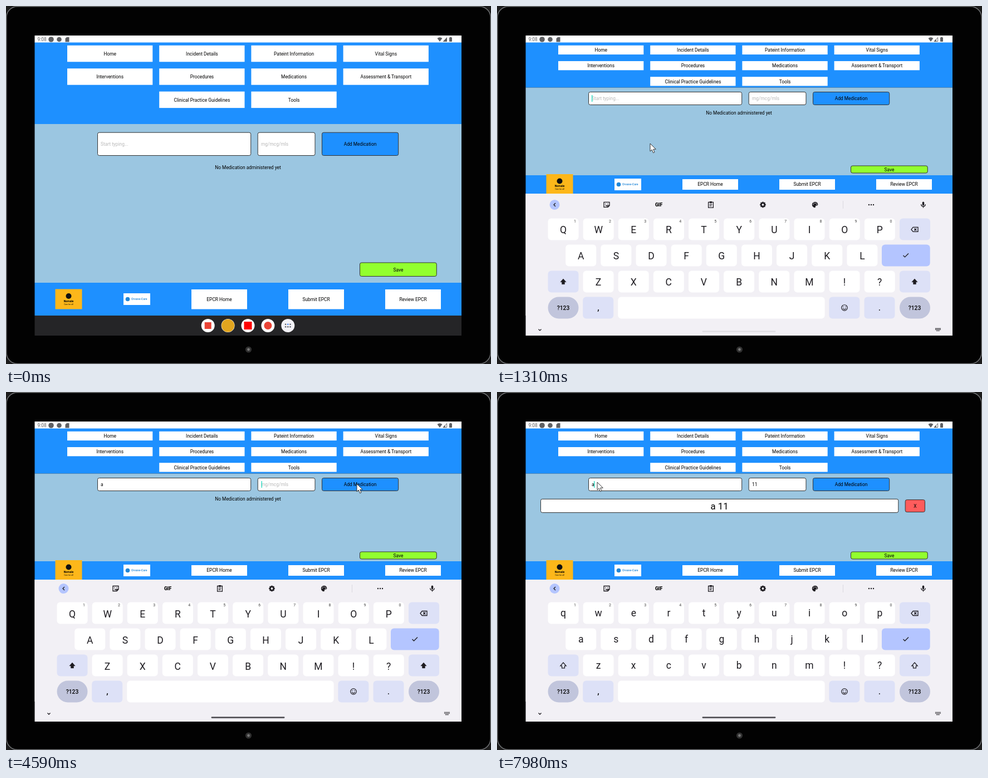
Write an HTML page that moves like this. It is 871 px wide and 643 px high and loops after 8000 ms.

```html
<!DOCTYPE html>
<html lang="en">
<head>
<meta charset="utf-8">
<title>Medication entry</title>
<style>
  html, body { margin: 0; width: 100%; height: 100%; overflow: hidden; background: #1c1c1c; }
  svg { display: block; width: 871px; height: 643px; }
  text { font-family: Roboto, "Open Sans", sans-serif; }
</style>
</head>
<body>
<svg id="stage" viewBox="0 0 871 643" xmlns="http://www.w3.org/2000/svg"></svg>
<script>
const LOOP = 8000;
const BLUE = '#1e90ff', PALE = '#9bc6e1', INK = '#1d1b20', KEY_ALT = '#dde1f7', ACCENT = '#b4c5ff';

const rect = (x, y, w, h, fill, extra = '') =>
  `<rect x="${x}" y="${y}" width="${w}" height="${h}" fill="${fill}" ${extra}/>`;
const disc = (x, y, r, fill, extra = '') => `<circle cx="${x}" cy="${y}" r="${r}" fill="${fill}" ${extra}/>`;
// y is the vertical middle of the capitals
const text = (s, x, y, size = 8.4, anchor = 'middle', extra = '') =>
  `<text x="${x}" y="${y + size * 0.355}" font-size="${size}" text-anchor="${anchor}" ${extra}>${s}</text>`;
const line = (d, extra = '') =>
  `<path d="${d}" fill="none" stroke="${INK}" stroke-width="1.3" ${extra}/>`;
const at = (x, y, body) => `<g transform="translate(${x} ${y})">${body}</g>`;
const group = (id, body) => `<g id="${id}">${body}</g>`;
const outlined = 'rx="3" stroke="#333" stroke-width="1"';

function statusBar() {
  const grey = '#5f6063';
  return rect(51.5, 53, 766.5, 12.5, '#fff')
    + text('9:08', 56.5, 60, 8.4, 'start', `fill="${grey}"`)
    + disc(81, 60, 4.8, grey) + disc(95.5, 60, 4.3, grey)
    + `<path d="M109 56h4.5v8.5h-7v-6z" fill="${grey}"/>`
    + `<path d="M774.5 58Q779 54.5 783.5 58L779 64Z" fill="${grey}"/>`
    + group('signalFull', `<path d="M784.5 64h7.5v-8z" fill="${grey}"/>`)
    + group('signalWeak', `<path d="M785 63.6h6.6v-7z" fill="#fff" stroke="${grey}" stroke-width=".9"/><path d="M784.5 64h4.3v-4.5z" fill="${grey}"/>`)
    + rect(796, 56.5, 5, 7.5, grey, 'rx=".7"') + rect(797.5, 55.5, 2, 1.5, grey);
}

function app(compact) {
  const L = compact
    ? { step: 28.2, h: 16.3, head: 146.5, field: 154, fieldH: 24, save: 286.5, saveH: 14, foot: 304, end: 337, btn: 311, btnH: 19, logo: 302, logoH: 35, name: 310 }
    : { step: 41.4, h: 29.5, head: 212, field: 226.7, fieldH: 42.3, save: 460.5, saveH: 25.5, foot: 497, end: 556, btn: 509, btnH: 35.5, logo: 508.5, logoH: 36, name: 516 };
  const tabs = ['Home', 'Incident Details', 'Pateint Information', 'Vital Signs',
    'Interventions', 'Procedures', 'Medications', 'Assessment &amp; Transport',
    null, 'Clinical Practice Guidelines', 'Tools'];
  const mid = L.field + L.fieldH / 2;
  let s = rect(51.5, 65, 766.5, L.head - 65, BLUE) + rect(51.5, L.head, 766.5, L.foot - L.head, PALE)
    + rect(51.5, L.foot, 766.5, L.end - L.foot, BLUE);
  tabs.forEach((name, i) => {
    if (!name) return;
    const x = 110 + (i % 4) * 165.2, y = 70.8 + Math.floor(i / 4) * L.step;
    s += rect(x, y, 153.3, L.h, '#fff') + text(name, x + 76.7, y + L.h / 2 + .2);
  });
  s += rect(164.5, L.field + .5, 275.2, L.fieldH - 1, '#fff', outlined)
    + rect(452.2, L.field + .5, 102.8, L.fieldH - 1, '#fff', outlined)
    + group(compact ? 'addButton' : 'addButtonTall',
      rect(567.5, L.field + .5, 137.2, L.fieldH - 1, BLUE, outlined) + text('Add Medication', 636, mid))
    + rect(635.5, L.save + .5, 137.8, L.saveH - 1, '#92ff2f', outlined)
    + text('Save', 704.4, L.save + L.saveH / 2 + .3);
  ['EPCR Home', 'Submit EPCR', 'Review EPCR'].forEach((name, i) => {
    s += rect(333 + i * 174, L.btn, 100, L.btnH, '#fff') + text(name, 383 + i * 174, L.btn + L.btnH / 2);
  });
  s += rect(88.5, L.logo, 48, L.logoH, '#fdb71a') + disc(112.5, L.logo + 12.5, 5, '#111')
    + text('Norvale', 112.5, L.logo + 21.5, 5, 'middle', 'font-weight="700"')
    + text('Care for all', 112.5, L.logo + 27, 3.4)
    + rect(211, L.name, 48, 21, '#fff') + disc(218.5, L.name + 10.5, 3.8, '#1f86d8')
    + text('Orvane-Care', 225, L.name + 10.5, 5.1, 'start', 'fill="#1f86d8" font-weight="500"');
  const hint = 'fill="#b9b9b9"';
  return compact ? s : s + text('Start typing...', 170, mid, 8.4, 'start', hint)
    + text('mg/mcg/mls', 458, mid, 8.4, 'start', hint) + text('No Medication administered yet', 434.5, 289.7);
}

function entries() {
  const hint = 'fill="#b9b9b9"';
  return group('hintName', text('Start typing...', 170, 166, 8.4, 'start', hint))
    + group('hintDose', text('mg/mcg/mls', 458, 166, 8.4, 'start', hint))
    + group('name', text('a', 170, 166, 8.4, 'start'))
    + group('underline', rect(170, 170, 4.6, .8, '#222'))
    + '<text id="dose" x="458" y="169" font-size="8.4"></text>'
    + group('empty', text('No Medication administered yet', 434.5, 192))
    + group('row', rect(78.5, 192.3, 642.3, 24.3, '#fff', outlined) + text('a 11', 399.5, 205, 16.8)
      + rect(733.2, 193.6, 35.3, 22, '#ff5c5c', outlined) + text('X', 750.8, 204.7));
}

function dock() {
  const tile = (i, fill, body = '') => at((i - 2) * 35.9, 0, disc(0, 0, 12, fill) + body);
  let dots = '';
  for (let i = 0; i < 6; i++) dots += disc((i % 3 - 1) * 4.2, i < 3 ? -2.2 : 2.2, 1.3, i === 1 ? '#4285f4' : '#5a5d66');
  return group('dockStrip', rect(51.5, 556, 766.5, 36, '#252527'))
    + group('dockIcons', tile(0, '#fff', rect(-6, -6, 12, 12, '#ea4335'))
      + tile(1, '#fff', disc(0, 0, 11.5, '#e2a51f'))
      + tile(2, '#fff', rect(-7, -7, 14, 14, '#f00'))
      + tile(3, '#fff', disc(0, 0, 7, '#ea4335'))
      + tile(4, '#f3f2f7', dots));
}

function toolbar() {
  const y = 353;
  let teeth = '';
  for (let a = 0; a < 360; a += 45) teeth += rect(-1.3, -5.3, 2.6, 3, INK, `transform="rotate(${a})"`);
  return line(`M105 ${y - 3}l-3 3l3 3`)
    + at(197, y, line('M-5-4.5H5V1.5L2 4.5H-5ZM2 4.5V1.5H5') + disc(-2, -1.5, .8, INK) + disc(2, -1.5, .8, INK) + line('M-2 1Q0 3 2 1'))
    + text('GIF', 290.5, y, 8.6, 'middle', 'font-weight="900"')
    + at(384, y, line('M-4.4-4.5H4.4V5.2H-4.4Z') + rect(-2, -6, 4, 3, INK) + line('M-2.4-.8H2.4M-2.4 2H1.5', 'stroke-width="1"'))
    + at(477.5, y, teeth + disc(0, 0, 2.9, 'none', `stroke="${INK}" stroke-width="2"`))
    + at(571, y, `<path d="M0-5.2A5.2 5.2 0 1 0 0 5.2Q1.8 4.5 .9 2.6Q1.2 1.3 3 1.5Q5.4 1.3 5.4-.5Q4.8-5 0-5.2Z" fill="${INK}"/>`
      + [[-3, -.5], [-1.6, -2.8], [1.5, -2.8], [3.2, -.6]].map(p => disc(...p, .8, '#f2f0f5')).join(''))
    + rect(621, y - 7, .8, 14, '#d5d3da')
    + [-4, 0, 4].map(d => disc(672 + d, y, 1.2, INK)).join('');
}

function suggestions() {
  return line('M102 350l3 3l-3 3')
    + ['a', 'and', 'are'].map((w, i) => text(w, 220 + i * 214, 354, 14, 'middle', 'fill="#333"')).join('')
    + rect(320.5, 346, .8, 14, '#d5d3da') + rect(547, 346, .8, 14, '#d5d3da');
}

function letters(upper) {
  let s = '';
  ['qwertyuiop', 'asdfghjkl', 'zxcvbnm!?'].forEach((row, r) => {
    [...row].forEach((c, i) => {
      const x = [119, 150.7, 182][r] + i * 63.15;
      s += text(upper ? c.toUpperCase() : c, x, (upper ? 398.3 : 397.2) + r * 47, 17.5, 'middle', `fill="${INK}"`);
    });
  });
  [119, 750].forEach(x => {
    s += at(x, 491.3, `<path d="M0-5.3L5.2 .6H2.5V4.6H-2.5V.6H-5.2Z" fill="${upper ? INK : 'none'}" stroke="${INK}" stroke-width="${upper ? .4 : 1.2}"/>`);
  });
  return s;
}

function keyboard() {
  const key = (x, row, w = 55, fill = '#fff', r = 6) => rect(x, 377.5 + row * 47, w, 39, fill, `rx="${r}"`);
  let s = '';
  for (let i = 0; i < 10; i++) {
    s += key(91.5 + i * 63.15, 0) + text((i + 1) % 10, 140 + i * 63.05, 383, 7, 'middle', 'fill="#444"');
    if (i < 9) s += key(123.2 + i * 63.15, 1) + key(154.5 + i * 63.15, 2);
  }
  s += key(723, 0, 55, KEY_ALT) + key(691, 1, 86.7, ACCENT) + key(91.5, 2, 55, KEY_ALT) + key(723, 2, 55, KEY_ALT)
    + key(91.5, 3, 55, '#c1c5dc', 19.5) + key(154.2, 3, 55, KEY_ALT) + key(217.3, 3, 371.3)
    + key(596.4, 3, 55, KEY_ALT) + key(659.5, 3, 55, KEY_ALT) + key(723, 3, 55, '#c1c5dc', 19.5)
    + [119, 750].map(x => text('?123', x, 538, 10.3, 'middle', 'font-weight="500"')).join('')
    + text(',', 182, 537, 17) + text('.', 687, 537, 17)
    + at(624, 538, disc(0, 0, 5.2, 'none', `stroke="${INK}" stroke-width="1.2"`) + disc(-1.9, -1.4, .8, INK) + disc(1.9, -1.4, .8, INK) + line('M-2.8 1.2Q0 4.8 2.8 1.2', 'stroke-width="1.1"'))
    + at(750, 397.5, line('M-6 0L-2.8-4H6V4H-2.8Z', 'stroke-width="1.1"') + line('M-.6-2L3.2 2M3.2-2L-.6 2', 'stroke-width="1.1"'))
    + line('M729.5 444l3 3l6.5-6.5') + line('M74.5 576.5l2.5 2.5l2.5-2.5', 'stroke-width="1"')
    + line('M787 575.3h10M787 577.3h10M789 579.5h6', 'stroke-width="1" stroke-dasharray="1.4 .7" stroke="#444"')
    + disc(103.5, 353, 9, ACCENT)
    + at(765.5, 353, rect(-1.7, -5.5, 3.4, 7, INK, 'rx="1.7"') + line('M-3.8-.8Q-3.6 3 0 3Q3.6 3 3.8-.8M0 3V5.5', 'stroke-width="1.1"'))
    + group('tools', toolbar()) + group('words', suggestions())
    + group('upper', letters(true)) + group('lower', letters(false));
  return group('keyboard', rect(51.5, 337, 766.5, 255, '#f2f0f5')
    + `<g clip-path="url(#keys)">${group('keys-slide', s)}</g>`
    + rect(368.5, 583.3, 132, 2.6, '#55545a', 'rx="1.3" id="handle"'));
}

const stage = document.getElementById('stage');
stage.innerHTML = '<clipPath id="keys"><rect x="51.5" y="337" width="766.5" height="255"/></clipPath>'
  + rect(0, 0, 871, 643, '#1c1c1c') + rect(.7, .7, 869.6, 641.8, '#020202', 'rx="20" stroke="#77797b" stroke-width="1.4"')
  + disc(435.5, 617, 5.6, '#303030') + disc(435.5, 617, 2.4, '#777')
  + group('tall', app(false)) + group('blank', rect(51.5, 337, 766.5, 219, '#fff') + rect(51.5, 556, 766.5, 36, '#020202'))
  + group('dock', dock()) + group('short', app(true) + entries()) + keyboard() + statusBar()
  + rect(0, 0, 1.3, 12, '#19d9be', 'id="caret"')
  + '<path id="pointer" d="M0 0V14L3.2 11.1L5.5 16.7L8 15.6L5.7 10.2H10.3Z" fill="#fff" stroke="#222" stroke-width=".9"/>';

const $ = id => document.getElementById(id);
const show = (id, on) => $(id).style.display = on ? '' : 'none';
const ramp = (t, a, b) => Math.min(1, Math.max(0, (t - a) / (b - a)));
const mix = (a, b, k) => a + (b - a) * k;

// time, x, y of the pointer tip
const PATH = [[200, 691, 588], [340, 622, 500], [550, 420, 345], [770, 263, 235], [910, 275, 247],
  [2730, 275, 247], [3280, 335, 226], [3560, 405, 190], [3840, 462, 160], [4110, 478, 152], [4310, 524, 157],
  [4590, 630, 165], [5210, 630, 165], [5600, 617, 169], [7070, 617, 169], [7350, 400, 180],
  [7700, 196, 150], [7840, 183, 147], [7980, 180, 162]];

function pointerAt(t) {
  let i = 1;
  while (i < PATH.length - 1 && PATH[i][0] < t) i++;
  const [a, b] = [PATH[i - 1], PATH[i]], k = ramp(t, a[0], b[0]);
  return [mix(a[1], b[1], k), mix(a[2], b[2], k)];
}

// start of each caret placement, then its x; blinking restarts there
const CARETS = [[1110, 170], [2460, 174.3], [4110, 458.6], [4860, 462.8], [5370, 467.2], [7900, 174]];

function render(t) {
  const open = t >= 1235, focus = t >= 1110, typed = t >= 2460;
  const caps = t < 2460 || (t >= 4110 && t < 4860);
  const composing = t >= 2730 && t < 4110;
  const added = t >= 6640;

  show('tall', !open);
  show('short', open);
  show('blank', focus);
  show('dock', !open);
  show('keyboard', open);
  show('signalFull', t < 1050);
  show('signalWeak', t >= 1050);

  const fold = ramp(t, 1080, 1180);
  $('dockStrip').setAttribute('transform', `translate(0 ${14 * fold})`);
  $('dockStrip').setAttribute('clip-path', 'none');
  $('dockStrip').firstChild.setAttribute('height', 36 - 14 * fold);
  $('dockIcons').setAttribute('transform', `translate(434.5 ${mix(574, 578, fold)}) scale(${mix(1, .708, fold)})`);
  $('dockIcons').setAttribute('opacity', mix(1, .82, fold));

  const slide = t < 1310 ? mix(30, 4, ramp(t, 1235, 1310)) : mix(4, 0, ramp(t, 1310, 1380));
  $('keys-slide').setAttribute('transform', `translate(0 ${slide})`);
  $('keys-slide').setAttribute('opacity', mix(.3, 1, ramp(t, 1235, 1310)));
  $('handle').setAttribute('opacity', mix(.1, 1, ramp(t, 1310, 1520)));
  show('upper', caps);
  show('lower', !caps);
  show('words', composing);
  show('tools', !composing);

  show('hintName', !typed);
  show('name', typed);
  show('underline', typed && t < 4110);
  show('hintDose', t < 4860);
  $('dose').textContent = t >= 5370 ? '11' : t >= 4860 ? '1' : '';
  show('empty', !added);
  show('row', added);
  $('addButton').setAttribute('opacity', 1 - .8 * (ramp(t, 6280, 6430) - ramp(t, 6640, 6890)));

  const caret = CARETS.filter(c => c[0] <= t).pop();
  show('caret', caret && Math.floor((t - caret[0]) / 505) % 2 === 0);
  if (caret) $('caret').setAttribute('transform', `translate(${caret[1]} ${open ? 160 : 242})`);

  show('pointer', t >= 200);
  $('pointer').setAttribute('transform', `translate(${pointerAt(t).join(' ')})`);
}

const start = performance.now();
function tick() {
  render((performance.now() - start) % LOOP);
  requestAnimationFrame(tick);
}
tick();
</script>
</body>
</html>
```
